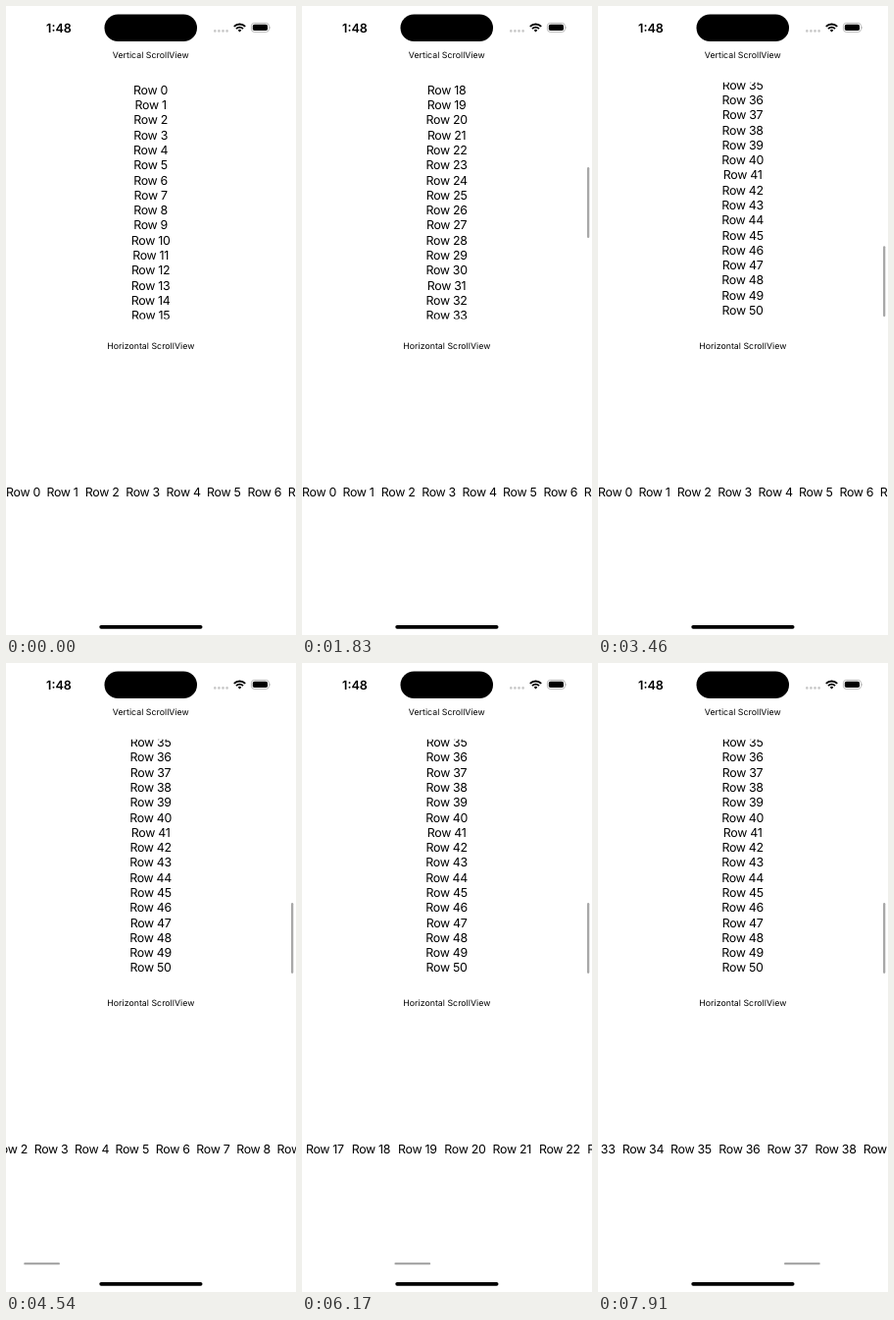
An HTML page that plays this animation: 296x640 px, repeating every 8000 ms.

```html
<!DOCTYPE html>
<html lang="en">
<head>
<meta charset="utf-8">
<title>Scroll views</title>
<style>
  html, body { margin: 0; width: 100%; height: 100%; overflow: hidden; background: #fff; }
  svg { display: block; }
  text { font-family: Inter, "Open Sans", sans-serif; text-rendering: geometricPrecision; }
  .row { font-size: 12.4px; letter-spacing: -.3px; }
  .caption { font-size: 8.75px; letter-spacing: .04px; }
  .clock { font-size: 12.6px; font-weight: 600; }
  .middle { text-anchor: middle; }
</style>
</head>
<body>
<svg id="stage" width="296" height="640" viewBox="0 0 296 640">
  <text class="clock middle" x="54" y="26.8">1:48</text>
  <rect x="100.5" y="8.5" width="94.5" height="27.6" rx="13.8"/>
  <g fill="#c9c9c9">
    <circle cx="213.3" cy="25.4" r="1.3"/><circle cx="217.4" cy="25.4" r="1.3"/>
    <circle cx="221.5" cy="25.4" r="1.3"/><circle cx="225.6" cy="25.4" r="1.3"/>
  </g>
  <path d="M232.8 20.9A8 8 0 0 1 244.2 20.9M235 23.1A4.9 4.9 0 0 1 242 23.1" fill="none" stroke="#000" stroke-width="1.9"/>
  <path d="M238.5 26.6L236.7 24.8A2.5 2.5 0 0 1 240.3 24.8Z"/>
  <rect x="250.4" y="17.4" width="18" height="9" rx="2.9" fill="none" stroke="#a6a6a6" stroke-width=".8"/>
  <rect x="251.8" y="18.8" width="15.2" height="6.2" rx="1.8"/>
  <path d="M269.5 20.4Q271 21.9 269.5 23.4Z" fill="#a6a6a6"/>

  <text class="caption middle" x="147.8" y="52.7">Vertical ScrollView</text>
  <svg y="77.7" width="296" height="240.8" overflow="hidden"><g id="column"></g></svg>
  <rect id="columnBar" x="291" width="2.3" height="72" rx="1.15" fill="#a8a8a8"/>

  <text class="caption middle" x="147.8" y="349">Horizontal ScrollView</text>
  <g id="strip"></g>
  <rect id="stripBar" y="610" width="36.8" height="2.3" rx="1.15" fill="#a8a8a8"/>

  <rect x="95.3" y="630" width="105.2" height="3.7" rx="1.85"/>
</svg>
<script>
const LOOP = 8000, ROWS = 51, PITCH = 15.29;
const $ = id => document.getElementById(id);

// Bursts of screen updates: first change, last change, number of changes (ms)
const bursts = [
  [500, 1290, 8], [1430, 2230, 9], [2340, 3060, 8], [3160, 3460, 4],
  [4210, 4990, 8], [5110, 5890, 8], [6060, 6840, 8], [6940, 7710, 8], [7810, 7910, 2]
];

// Scroll offsets over time: [ms, px]
const columnKeys = [[400, 0], [900, 60], [1340, 105], [1830, 275.2], [2750, 488], [3460, 540.3], [4210, 539.8]];
const stripKeys = [[4110, 0], [4700, 220], [5444, 541], [5980, 645], [6840, 1207], [7910, 1543], [8300, 1600]];

function lastUpdate(t) {
  let shown = 0;
  for (const [start, end, count] of bursts) {
    if (t < start) break;
    const step = (end - start) / (count - 1);
    shown = start + step * Math.min(count - 1, Math.floor((t - start) / step + .01));
  }
  return shown;
}

// Monotone cubic interpolation, at rest at both ends
function interpolate(keys, t) {
  const last = keys.length - 1;
  if (t <= keys[0][0]) return keys[0][1];
  if (t >= keys[last][0]) return keys[last][1];
  const slope = i => (keys[i + 1][1] - keys[i][1]) / (keys[i + 1][0] - keys[i][0]);
  const tangent = i => {
    if (i === 0 || i === last) return 0;
    const a = slope(i - 1), b = slope(i);
    return a * b > 0 ? 2 * a * b / (a + b) : 0;
  };
  const i = keys.findIndex(k => k[0] > t) - 1;
  const [t0, p0] = keys[i], [t1, p1] = keys[i + 1];
  const span = t1 - t0, u = (t - t0) / span, v = 1 - u;
  return p0 * v * v * (1 + 2 * u) + p1 * u * u * (3 - 2 * u)
    + span * u * v * (tangent(i) * v - tangent(i + 1) * u);
}

function addRow(parent, n, x, y, className) {
  const text = document.createElementNS("http://www.w3.org/2000/svg", "text");
  text.setAttribute("class", className);
  text.setAttribute("x", x);
  text.setAttribute("y", y);
  text.textContent = "Row " + n;
  parent.append(text);
}

const digitAdvance = d => d === "1" ? 5.9 : d === "7" ? 7.4 : 7.9;

let stripX = 0;
for (let n = 0; n < ROWS; n++) {
  addRow($("column"), n, 147.6, 12.1 + n * PITCH, "row middle");
  addRow($("strip"), n, stripX, 499, "row");
  stripX += 33.5 + [...String(n)].reduce((sum, d) => sum + digitAdvance(d), 0);
}

function draw(now) {
  const t = lastUpdate(now % LOOP);
  const down = interpolate(columnKeys, t), across = interpolate(stripKeys, t);
  $("column").setAttribute("transform", `translate(0 ${-down})`);
  $("strip").setAttribute("transform", `translate(${-across} 0)`);
  $("columnBar").setAttribute("y", 81 + .302 * down);
  $("stripBar").setAttribute("x", 7.1 + .1185 * across);
  $("columnBar").setAttribute("opacity", t >= 500 ? 1 : 0);
  $("stripBar").setAttribute("opacity", t >= 4210 ? 1 : 0);
}

const began = performance.now();
function tick() {
  draw(performance.now() - began);
  requestAnimationFrame(tick);
}
tick();
</script>
</body>
</html>
```
